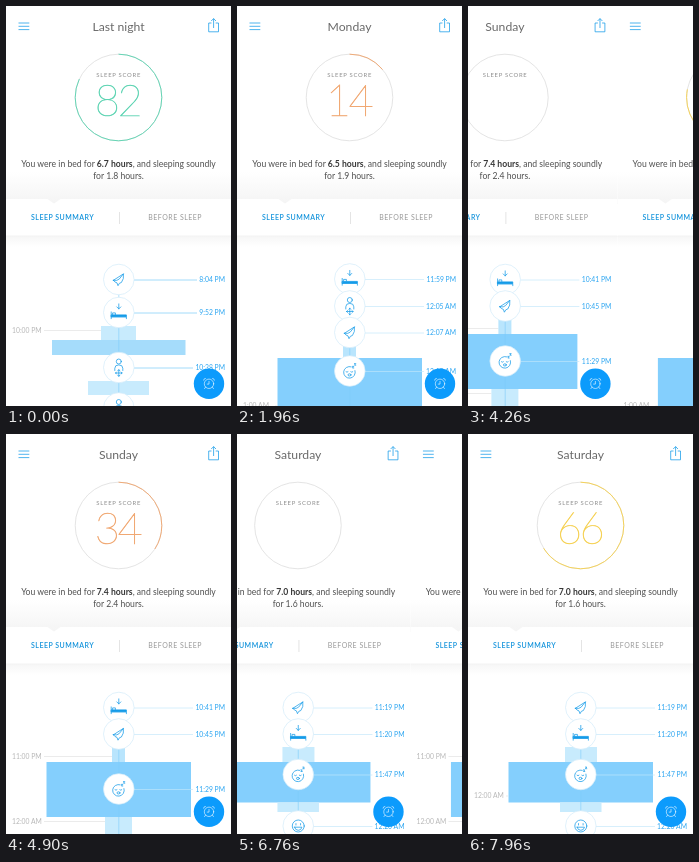
Animation, 225 px wide and 400 px high, one loop 8000 ms. Source, as an HTML page:

```html
<!DOCTYPE html>
<html lang="en">
<head>
<meta charset="utf-8">
<title>Sleep summary</title>
<style>
  html, body { margin: 0; width: 100%; height: 100%; overflow: hidden; background: #fff; }
  svg { display: block; width: 100vw; height: 100vh; font-family: Lato, "Open Sans", sans-serif; }
  .mid { text-anchor: middle; }
  .title { font-size: 12.2px; fill: #6a6a6a; }
  .caption { font-size: 5.9px; letter-spacing: .72px; fill: #8c8c8c; }
  .score { font-size: 43.5px; font-weight: 100; letter-spacing: -2.6px; stroke-width: .55; }
  .copy { font-size: 8.63px; fill: #505050; }
  .copy .bold { font-weight: 700; fill: #383838; }
  .tab { font-size: 7px; letter-spacing: .48px; fill: #999; }
  .tab.on { fill: #1594dc; font-weight: 600; }
  .time { font-size: 6.8px; fill: #2ba5f1; text-anchor: end; }
  .hour { font-size: 6.8px; fill: #b8b8b8; }
  .blue, .icon { fill: none; stroke: #159be8; stroke-width: .75; }
  .icon { stroke-linejoin: round; stroke-linecap: round; }
  .icon .solid { fill: #159be8; }
  .clock { fill: none; stroke: #fff; stroke-width: .6; stroke-linecap: round; }
</style>
</head>
<body>
<svg viewBox="0 0 225 400" preserveAspectRatio="none">
  <defs>
    <linearGradient id="shade" x2="0" y2="1">
      <stop offset="0" stop-color="#fff"/><stop offset="1" stop-color="#f4f4f4"/>
    </linearGradient>
    <linearGradient id="drop" x2="0" y2="1">
      <stop offset="0" stop-color="#f6f6f6"/><stop offset="1" stop-color="#fff"/>
    </linearGradient>
    <g id="bird" class="icon">
      <path d="M-5.4 .8L4.6 -5.6Q5.4 -.6 2.6 3L.6 3.8L-.8 6.2L-1.8 3.4Q-4 3-5.4 .8ZM-5.4 .8Q-1.4 1.6 .4 -.4L4.6 -5.6"/>
    </g>
    <g id="bed" class="icon">
      <path d="M0 -8.6V-3.6M-2 -5.6L0 -3.6L2 -5.6M-7.6 -.6V6.2M-7.6 4.4H7.6V6.2M-6.2 2V.4H-3.4V2"/>
      <path class="solid" d="M-7.4 2.4H7.6V4.2H-7.4Z"/>
    </g>
    <g id="person" class="icon">
      <circle cy="-6" r="2.5"/>
      <path d="M-4 3V.8Q-4 -2.6 0 -2.6Q4 -2.6 4 .8V3"/>
      <path d="M0 2.2V8.8M-3.3 5.5H3.3M-1 3.2L0 2.2L1 3.2M-1 7.8L0 8.8L1 7.8M-2.3 4.5L-3.3 5.5L-2.3 6.5M2.3 4.5L3.3 5.5L2.3 6.5"/>
    </g>
    <g id="asleep" class="icon">
      <path d="M1.4 -4.2A5.8 5.8 0 1 0 5.2 -.4M-3.8 .8Q-2.8 1.8 -1.8 .8M1 .8Q2 1.8 3 .8M2.6 -4.6H4L2.6 -3H4M4.6 -7.4H6L4.6 -5.8H6"/>
      <ellipse cx="-.3" cy="3.9" rx="1.5" ry="1.1"/>
    </g>
    <g id="awake" class="icon">
      <circle r="6"/>
      <path d="M-2.3 -2.4V-1M2.3 -2.4V-1M-3.7 1.2H3.7Q3 4.3 0 4.3Q-3 4.3 -3.7 1.2Z"/>
    </g>
    <g id="top">
      <path class="blue" d="M12.5 17H23.3M12.5 20.3H23.3M12.5 23.6H23.3"/>
      <path class="blue" d="M205.5 17H202.7V25.8H212.5V17H209.7M207.6 22V12.6M205.2 15L207.6 12.6L210 15"/>
      <circle cx="112.5" cy="91.5" r="43.3" fill="none" stroke="#d9d9d9" stroke-width=".7"/>
      <text class="mid caption" x="112.7" y="71">SLEEP SCORE</text>
    </g>
    <g id="tabs">
      <path d="M0 166H225V198H0Z" fill="url(#shade)"/>
      <path d="M0 193H41.5L48 197.5L54.5 193H225V230H0Z" fill="#fff"/>
      <path d="M0 230H225V241H0Z" fill="url(#drop)"/>
      <path d="M0 230H225" stroke="#ececec" stroke-width=".6"/>
      <path d="M113.5 206V218" stroke="#d8d8d8" stroke-width=".7"/>
      <text class="tab on" x="25" y="214.2">SLEEP SUMMARY</text>
      <text class="tab" x="142.3" y="214.2">BEFORE SLEEP</text>
    </g>
    <g id="alarm">
      <circle r="15.2" fill="#0c9bfc"/>
      <circle class="clock" r="4.7"/>
      <path class="clock" d="M0 -2.4V.3H-1.8M-5.4 -3.6Q-5.4 -5.4 -3.6 -5.4M5.4 -3.6Q5.4 -5.4 3.6 -5.4M-3.4 3.4L-4.5 4.8M3.4 3.4L4.5 4.8"/>
    </g>
  </defs>
</svg>
<script>
const PALE = '#c8ebfd', SOFT = '#a5dcfb', DEEP = '#84cffd';
const LOOP = 8000, WIDTH = 225;
const SWIPE = 420, COUNT_DELAY = 433, COUNT = 1300;

// bars: [x, y, width, height, colour]; events: [y, icon, time]; hours: [y, label, line end]
const days = [
  { title: 'Last night', bed: '6.7', sound: '1.8', score: 82, line: '#72c7f8',
    bars: [[95, 320, 35, 14, PALE], [46, 334, 133.5, 15, SOFT], [82, 375, 61, 14, PALE]],
    events: [[273.5, 'bird', '8:04 PM'], [306.5, 'bed', '9:52 PM'], [361.5, 'person', '10:38 PM'], [402, 'person', '']],
    hours: [[324.5, '10:00 PM', 95]] },
  { title: 'Monday', bed: '6.5', sound: '1.9', score: 78, start: 1407, line: '#c2e6fb',
    bars: [[106, 338, 13, 14, '#b9e5fd'], [40.5, 352, 144.5, 48, DEEP]],
    events: [[273, 'bed', '11:59 PM'], [300, 'person', '12:05 AM'], [326.5, 'bird', '12:07 AM'], [365, 'asleep', '12:15 AM']],
    hours: [[400, '1:00 AM', 40]] },
  { title: 'Sunday', bed: '7.4', sound: '2.4', score: 76, start: 4133, line: '#c2e6fb',
    bars: [[106, 313, 13, 15, '#b9e5fd'], [40.5, 328, 144.5, 55, DEEP], [99, 383, 27, 17, PALE]],
    events: [[273.5, 'bed', '10:41 PM'], [300, 'bird', '10:45 PM'], [355, 'asleep', '11:29 PM']],
    hours: [[322.5, '11:00 PM', 106], [387.5, '12:00 AM', 99]] },
  { title: 'Saturday', bed: '7.0', sound: '1.6', score: 72, start: 6598, line: '#c2e6fb',
    bars: [[97, 313, 32, 15, PALE], [40.5, 328, 144.5, 40.5, DEEP], [92, 368.5, 41.5, 9.5, PALE]],
    events: [[273.5, 'bird', '11:19 PM'], [300, 'bed', '11:20 PM'], [340.5, 'asleep', '11:47 PM'], [392, 'awake', '12:20 AM']],
    hours: [[362, '12:00 AM', 40]] },
];

const hour = ([y, label, end]) => `
  <path d="M38 ${y}H${end}" stroke="#dedede" stroke-width=".6"/>
  <text class="hour" x="6" y="${y + 2.4}">${label}</text>`;

const bar = ([x, y, w, h, fill]) =>
  `<rect x="${x}" y="${y}" width="${w}" height="${h}" fill="${fill}"/>`;

const marker = line => ([y, icon, time]) => `
  ${time && `<path d="M128 ${y + .5}H${time.length > 7 ? 187 : 191}" stroke="${line}" stroke-width=".65"/>`}
  <circle cx="112.8" cy="${y}" r="15.3" fill="#fff" stroke="#d3ebfa" stroke-width=".7"/>
  <use href="#${icon}" x="112.8" y="${y}"/>
  <text class="time" x="219" y="${y + 2.9}">${time}</text>`;

const page = day => `<g class="page">
  <rect width="225" height="400" fill="#fff"/>
  <use href="#top"/>
  <text class="mid title" x="112.5" y="25">${day.title}</text>
  <circle class="arc" cx="112.5" cy="91.5" r="43.3" fill="none" stroke-width=".95" pathLength="100" transform="rotate(-90 112.5 91.5)"/>
  <text class="mid score" x="111.4" y="110.3"></text>
  <use href="#tabs"/>
  <text class="mid copy" x="112.5" y="161.3">You were in bed for <tspan class="bold">${day.bed} hours</tspan>, and sleeping soundly</text>
  <text class="mid copy" x="112.5" y="172.6">for ${day.sound} hours.</text>
  ${day.hours.map(hour).join('')}
  ${day.bars.map(bar).join('')}
  <path d="M112.8 273V400" stroke="#7ccbf8" stroke-width=".6"/>
  ${day.events.map(marker(day.line)).join('')}
  <use href="#alarm" x="203" y="377.8"/>
</g>`;

document.querySelector('svg').insertAdjacentHTML('beforeend', days.map(page).join(''));
const views = [...document.querySelectorAll('.page')].map(el => ({
  el, arc: el.querySelector('.arc'), number: el.querySelector('.score'),
}));

const clamp = v => Math.min(1, Math.max(0, v));
const easeOut = (v, power) => 1 - (1 - clamp(v)) ** power;
const tint = score => score < 50 ? '#f0a873' : score < 80 ? '#f5d154' : '#5fd4b3';

function draw(t) {
  const position = days.reduce(
    (sum, { start }) => sum + (start ? easeOut((t - start) / SWIPE, 3) : 0), 0);

  views.forEach(({ el, arc, number }, i) => {
    const { start, score } = days[i];
    const value = start ? score * easeOut((t - start - COUNT_DELAY) / COUNT, 2) : score;
    const x = (position - i) * WIDTH;
    el.setAttribute('transform', `translate(${x.toFixed(2)} 0)`);
    el.setAttribute('visibility', Math.abs(x) < WIDTH ? 'visible' : 'hidden');
    arc.setAttribute('stroke', value > 0 ? tint(value) : 'none');
    arc.setAttribute('stroke-dasharray', `${value.toFixed(2)} 100`);
    number.setAttribute('fill', tint(value));
    number.setAttribute('stroke', tint(value));
    number.textContent = value > 0 ? Math.round(value) : '';
  });
}

const origin = performance.now();
function tick() {
  draw((performance.now() - origin) % LOOP);
  requestAnimationFrame(tick);
}
tick();
</script>
</body>
</html>
```
